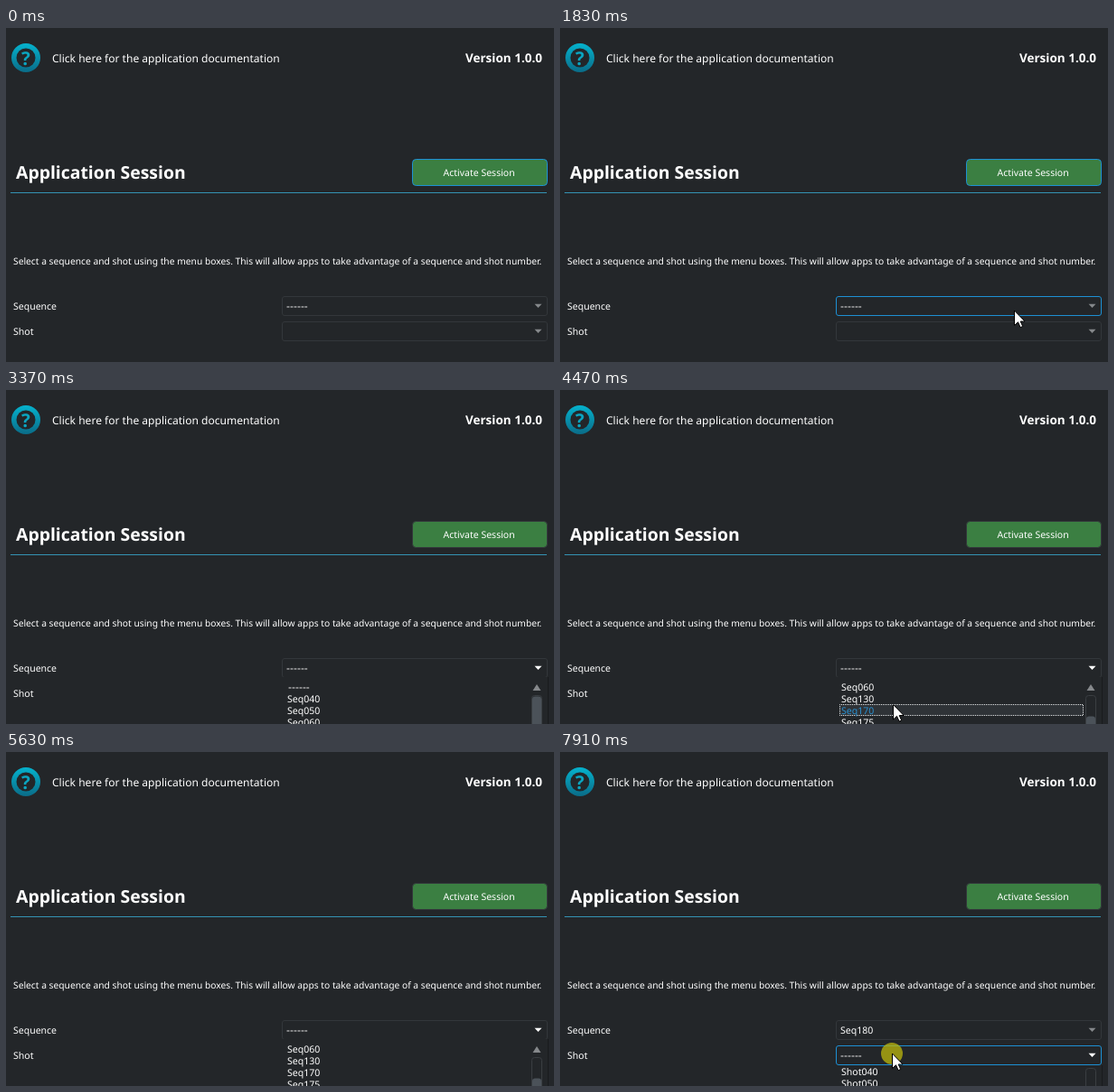
An HTML page with a canvas that plays this animation: 606x370 px, repeating every 8000 ms.

```html
<!DOCTYPE html>
<html lang="en">
<head>
<meta charset="utf-8">
<title>Application Session</title>
<style>
html, body { margin: 0; width: 100%; height: 100%; overflow: hidden; background: #232629; }
canvas { display: block; }
</style>
</head>
<body>
<canvas id="stage" width="606" height="370"></canvas>
<script>
const ctx = document.getElementById('stage').getContext('2d');
ctx.textRendering = 'geometricPrecision';

const LOOP = 8000;
const ROW = 13;
const C = {
  bg: '#232629', text: '#ffffff', edge: '#33373b', focus: '#1d90d4',
  dim: '#85888b', green: '#3b7f42', line: '#3493b3', row: '#2f3337', handle: '#4b5259'
};
const DASHES = '------';
const SEQUENCES = [DASHES, 'Seq040', 'Seq050', 'Seq060', 'Seq130', 'Seq170', 'Seq175', 'Seq180'];
const SHOTS = [DASHES, 'Shot040', 'Shot050'];
const SEQ_Y = 297, SHOT_Y = 325;

// Pointer moves: first change, last change, number of steps, end point
const START = [517, 371];
const MOVES = [
  [750, 830, 2, 516, 347],
  [980, 1750, 11, 502, 314],
  [1830, 1830, 1, 502, 313],
  [1910, 2210, 5, 466, 311],
  [3070, 3370, 5, 375, 379],
  [4000, 4000, 1, 371, 369],
  [4320, 4470, 3, 368, 348.5],
  [4550, 4700, 3, 367, 343],
  [4780, 5010, 4, 364, 359],
  [5160, 5160, 1, 364, 361],
  [5480, 5630, 3, 355, 379],
  [6650, 6650, 1, 362, 360],
  [6730, 7040, 5, 367, 334]
];
const CLICKS = [[2440, 2680], [5950, 6100], [7820, 8000]];

const within = (t, a, b) => t >= a && t < b;

function pointerAt(t) {
  let [x, y] = START;
  for (const [from, to, steps, endX, endY] of MOVES) {
    if (t < from) break;
    const done = t >= to ? steps : 1 + Math.floor((t - from) / (to - from) * (steps - 1));
    x += (endX - x) * done / steps;
    y += (endY - y) * done / steps;
  }
  return { x: Math.round(x), y: Math.round(y * 2) / 2 };
}

function text(str, x, y, size, color = C.text, weight = 400) {
  const family = str === DASHES ? '"DejaVu Sans"' : '"Noto Sans"';
  ctx.font = `${weight} ${size}px ${family}, sans-serif`;
  ctx.fillStyle = color;
  ctx.fillText(str, x, y);
}

function item(str, x, y, color) {
  text(str, x, y, str === DASHES ? 11 : 10.55, color);
}

function box(x, y, w, h, r, fill, stroke) {
  ctx.beginPath();
  ctx.roundRect(x, y, w, h, r);
  if (fill) { ctx.fillStyle = fill; ctx.fill(); }
  if (stroke) { ctx.strokeStyle = stroke; ctx.lineWidth = 1; ctx.stroke(); }
}

function polygon(points, fill, stroke) {
  ctx.beginPath();
  points.forEach(([x, y]) => ctx.lineTo(x, y));
  ctx.closePath();
  ctx.fillStyle = fill;
  ctx.fill();
  if (stroke) { ctx.strokeStyle = stroke; ctx.lineWidth = 1; ctx.stroke(); }
}

function disc(x, y, r, fill) {
  ctx.beginPath();
  ctx.arc(x, y, r, 0, Math.PI * 2);
  ctx.fillStyle = fill;
  ctx.fill();
}

function helpIcon() {
  const teal = ctx.createLinearGradient(0, 17, 0, 49);
  teal.addColorStop(0, '#05b2cd');
  teal.addColorStop(1, '#0a6c88');
  disc(22, 33, 16, teal);
  disc(22, 33, 10.5, C.bg);
  ctx.textAlign = 'center';
  text('?', 22, 40.5, 20.5, '#0ba5c0', 800);
  ctx.textAlign = 'left';
}

function page(buttonFocused) {
  ctx.fillStyle = C.bg;
  ctx.fillRect(0, 0, 606, 370);
  helpIcon();
  text('Click here for the application documentation', 51, 38, 12.05);
  text('Version 1.0.0', 508, 38, 13.5, C.text, 700);
  text('Application Session', 11, 167, 19.4, C.text, 700);
  box(449.5, 145.5, 149, 29, 4, C.green, buttonFocused ? C.focus : C.edge);
  text('Activate Session', 483.5, 164, 10.5);
  ctx.fillStyle = C.line;
  ctx.fillRect(5, 182, 593, 1);
  text('Select a sequence and shot using the menu boxes. This will allow apps to take ' +
    'advantage of a sequence and shot number.', 8, 262, 10.28);
  text('Sequence', 8, 312, 10.5);
  text('Shot', 8, 340, 10.6);
}

function combo(y, value, focused, active) {
  box(305.5, y + 0.5, 293, 21, 2.5, C.bg, focused ? C.focus : C.edge);
  item(value, 310, y + 15);
  polygon([[584.5, y + 8.7], [592.5, y + 8.7], [588.5, y + 13]], active ? C.text : C.dim);
}

function popup(y, items, scroll, slide, hovered) {
  const edge = y + (slide ? 22 : 21);
  const top = y + 25 - slide;
  ctx.save();
  ctx.beginPath();
  ctx.rect(305, edge, 296, 370 - edge);
  ctx.clip();
  ctx.fillStyle = C.bg;
  ctx.fillRect(305, edge, 296, 370 - edge);
  ctx.fillStyle = '#191b1d';
  ctx.fillRect(599, edge, 1, 370 - edge);

  items.slice(scroll).forEach((label, i) => {
    const rowY = top + i * ROW;
    const lit = i + scroll === hovered;
    if (lit) {
      ctx.fillStyle = C.row;
      ctx.fillRect(309, rowY, 270, ROW);
      ctx.setLineDash([1, 1]);
      ctx.lineDashOffset = 0.5;
      ctx.strokeStyle = '#e4e6e7';
      ctx.lineWidth = 1;
      ctx.strokeRect(309.5, rowY + 0.5, 269, ROW - 1);
      ctx.setLineDash([]);
    }
    item(label, label === DASHES ? 312 : 311, rowY + 11, lit ? '#2a8fcf' : C.text);
  });

  polygon([[582.5, top + 11], [591.5, top + 11], [587, top + 4]], C.dim);
  box(581.5, top + 16.5, 11, 90, 3, null, '#3a3e42');
  if (!slide) box(582, top + 17.5 + scroll * 7.3, 10, 60, 3, C.handle);
  ctx.restore();
}

function pointer({ x, y }) {
  const arrow = [[0, 0], [0, 16.5], [4, 12.8], [6.6, 18.6], [9.2, 17.5], [6.7, 12], [11.6, 12]];
  polygon(arrow.map(([px, py]) => [x + 0.5 + px, y + py]), '#fff', '#000');
}

function draw(t) {
  const p = pointerAt(t);
  const over = y => p.y >= y && p.y < y + 22;
  const chosen = t >= 6100;
  const seqOpen = within(t, 2520, 6100);
  const shotOpen = t >= 7910;

  page(t < 2520);
  combo(SEQ_Y, chosen ? 'Seq180' : DASHES,
    (over(SEQ_Y) && t < 2600) || within(t, 6100, 7910), seqOpen || within(t, 6100, 7910));
  combo(SHOT_Y, chosen ? DASHES : '', over(SHOT_Y) && t >= 6650, shotOpen);

  if (seqOpen) {
    const scroll = t < 3600 ? 0 : 3;
    const row = Math.max(0, Math.floor((p.y - SEQ_Y - 25.2) / ROW));
    popup(SEQ_Y, SEQUENCES, scroll, t < 2600 ? 16 : 0, row + scroll);
  }
  if (shotOpen) popup(SHOT_Y, SHOTS, 0, 16, 0);

  if (CLICKS.some(([from, to]) => within(t, from, to))) {
    disc(p.x, p.y, 12, 'rgba(190, 184, 12, 0.75)');
  }
  if (!within(t, 6100, 6650)) pointer(p);
}

const began = performance.now();
function frame() {
  draw((performance.now() - began) % LOOP);
  requestAnimationFrame(frame);
}
frame();
</script>
</body>
</html>
```
